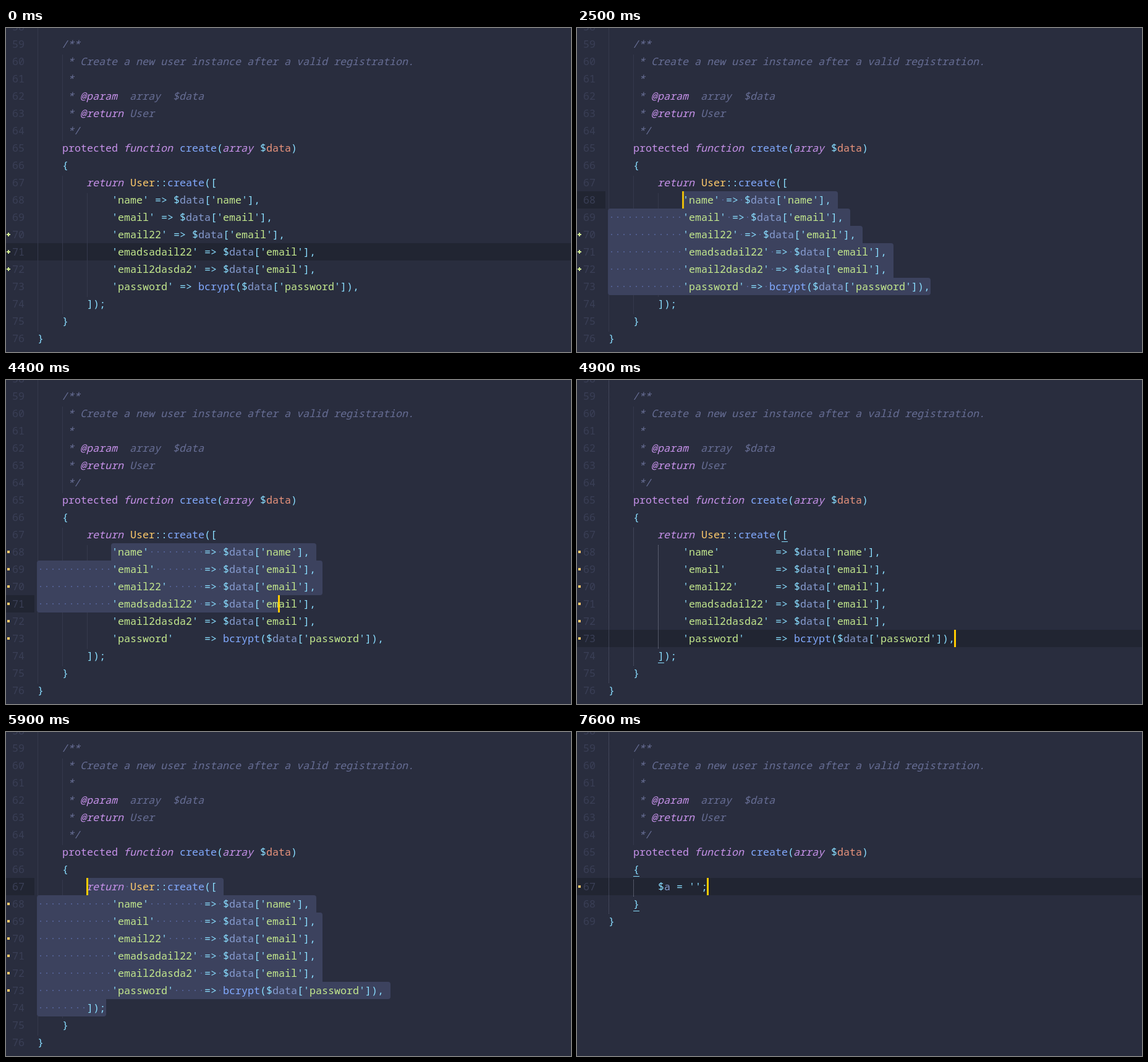
Recreate the animation shown at these times as an HTML page with a canvas. Size 914 px wide and 524 px high, loop 8 s.

```html
<!DOCTYPE html>
<html lang="en">
<head>
<meta charset="utf-8">
<title>Aligning code</title>
<style>
html, body { margin: 0; width: 100%; height: 100%; overflow: hidden; background: #292d3e; }
canvas { display: block; }
</style>
</head>
<body>
<canvas id="stage" width="914" height="524"></canvas>
<script>
const ctx = document.getElementById('stage').getContext('2d');
const W = 914, H = 524, LOOP = 8000;
const CELL = 10, ROW = 28, LEFT = 51, FIRST = 58;
const FACE = '16.667px "Noto Sans Mono", "DejaVu Sans Mono", monospace';

const C = {
  bg: '#292d3e', line: '#212532', select: '#3c425e', space: '#515e8f',
  number: '#3a3f56', guide: '#35394c', dotted: '#5a5f75', active: '#868a9c',
  caret: '#ffcc00', added: '#d3ec92', changed: '#ffcb6b',
  comment: '#676e95', key: '#c792ea', fn: '#82aaff', op: '#89ddff',
  str: '#c3e88d', type: '#ffcb6b', arg: '#e8937c', name: '#869bcf'
};
const WORDS = {
  protected: C.key, function: C.key, array: C.key, return: C.key,
  create: C.fn, bcrypt: C.fn, User: C.type, data: C.name, a: C.name
};
const SLANTED = ['function', 'array', 'return'];

const HEAD = [
  '',
  '    /**',
  '     * Create a new user instance after a valid registration.',
  '     *',
  '     * @param  array  $data',
  '     * @return User',
  '     */',
  '    protected function create(array $data)',
  '    {'
];
const FIELDS = [
  ['name', 'name'], ['email', 'email'], ['email22', 'email'],
  ['emadsadail22', 'email'], ['email2dasda2', 'email'], ['password', 'password']
];

const rowTop = row => (row - FIRST) * ROW - 16;
const colX = col => LEFT + col * CELL;

function makeLines(t) {
  let body;
  if (t >= 6500) {
    body = [' '.repeat(8) + typed(t)];
  } else {
    const width = t >= 2800 ? 14 : 0;
    const fields = FIELDS.map(([key, src]) => {
      const value = `$data['${src}']`;
      const right = key === 'password' ? `bcrypt(${value})` : value;
      return ' '.repeat(12) + `'${key}'`.padEnd(width) + ` => ${right},`;
    });
    body = ['        return User::create([', ...fields, '        ]);'];
  }
  return [...HEAD, ...body, '    }', '}'];
}

const KEYS = [[6800, 2], [6900, 3], [7100, 4], [7200, 5], [7300, 7], [7600, 8]];
function typed(t) {
  const hit = KEYS.filter(([at]) => t >= at).pop();
  return "$a = '';".slice(0, hit ? hit[1] : 0);
}

// A drag yields one caret place every 100 ms.
function drag(start, count, from, to, anchor) {
  return Array.from({ length: count }, (_, i) => {
    const k = i / (count - 1);
    const pos = from.map((v, j) => Math.round(v + (to[j] - v) * k));
    return [start + i * 100, pos, anchor, 1];
  });
}

// time, caret, selection anchor, caret opacity
const RAW_END = [73, 52], END = [73, 56], TOP = [68, 12], CLOSE = [74, 11];
const STEPS = [
  [0, [71, 0], null, 0],
  [1000, RAW_END, null, 1],
  [1100, [71, 37], RAW_END, 1],
  ...drag(1300, 7, [69, 25], TOP, RAW_END),
  [2500, TOP, RAW_END, 0.88],
  [2600, TOP, RAW_END, 0],
  [2800, TOP, END, 1],
  [3200, TOP, END, 0.88],
  [3300, TOP, END, 0],
  [3800, TOP, null, 1],
  ...drag(4100, 6, [68, 14], [73, 55], TOP),
  [4900, END, null, 1],
  [5300, CLOSE, null, 1],
  ...drag(5400, 4, [73, 11], [68, 9], CLOSE),
  [5900, [67, 8], CLOSE, 1]
];

function caretState(t, lines) {
  if (t >= 6500) {
    const inside = t >= 7300 && t < 7400 ? 1 : 0;
    return { pos: [67, lines[67 - FIRST].length - inside], anchor: null, ink: 1 };
  }
  const [, pos, anchor, ink] = STEPS.filter(s => t >= s[0]).pop();
  return { pos, anchor, ink };
}

function rect(color, x, y, w, h) {
  ctx.fillStyle = color;
  ctx.fillRect(x, y, w, h);
}

// Punctuation is a little heavier; slanted text leans from one pixel further left.
function put(text, col, row, color, slant) {
  const weight = color === C.op ? '500 ' : '';
  ctx.font = (slant ? 'italic ' : '') + weight + FACE;
  ctx.fillStyle = color;
  [...text].forEach((ch, i) => {
    if (ch !== ' ') ctx.fillText(ch, colX(col + i) - (slant ? 1 : 0), rowTop(row) + 20);
  });
}

function drawLine(text, row) {
  const note = row < 65;
  const pattern = note ? /@\w+|[^@]+/g : /'[^']*'|\w+|\s+|./g;
  for (const { 0: tok, index } of text.matchAll(pattern)) {
    if (note) {
      put(tok, index, row, tok[0] === '@' ? C.key : C.comment, true);
    } else if (tok.length > 1 && tok[0] === "'") {
      put("'", index, row, C.op);
      put(tok.slice(1, -1), index + 1, row, C.str);
      put("'", index + tok.length - 1, row, C.op);
    } else {
      const color = row === 65 && tok === 'data' ? C.arg : WORDS[tok] || C.op;
      put(tok, index, row, color, SLANTED.includes(tok));
    }
  }
}

function guide(col, from, to, color, dotted) {
  const x = colX(col), y0 = rowTop(from) + 3, y1 = rowTop(to + 1) + 3;
  if (!dotted) return rect(color, x, y0, 1, y1 - y0);
  for (let y = y0; y < y1; y += 2) rect(color, x, y, 1, 1);
}

function drawGuides(last, dotted) {
  const outer = dotted ? C.dotted : C.guide;
  const inner = dotted ? C.active : C.guide;
  const nested = last > 70;
  guide(0, FIRST, last - 1, outer, dotted);
  guide(4, 60, 64, C.guide, false);
  guide(4, 67, last - 2, nested ? outer : inner, dotted);
  if (nested) guide(8, 68, 73, inner, dotted);
}

function drawSelection(a, b, lines) {
  const [from, to] = a[0] < b[0] || (a[0] === b[0] && a[1] < b[1]) ? [a, b] : [b, a];
  const spans = [];
  for (let row = from[0]; row <= to[0]; row++) {
    const start = row === from[0] ? from[1] : 0;
    const end = row === to[0] ? to[1] : lines[row - FIRST].length + 1;
    spans.push({ row, start, end });
  }
  const covers = (s, col) => s && s.start <= col && s.end >= col;
  spans.forEach((s, i) => {
    const up = spans[i - 1], down = spans[i + 1];
    const r = (n, col) => covers(n, col) ? 0 : 4;
    ctx.fillStyle = C.select;
    ctx.beginPath();
    ctx.roundRect(colX(s.start) - 1, rowTop(s.row), (s.end - s.start) * CELL + 2, ROW,
      [r(up, s.start), r(up, s.end), r(down, s.end), r(down, s.start)]);
    ctx.fill();
    const text = lines[s.row - FIRST];
    for (let c = s.start; c < Math.min(s.end, text.length); c++) {
      if (text[c] === ' ') rect(C.space, colX(c) + 4, rowTop(s.row) + 13, 2, 2);
    }
  });
}

function drawMarks(t) {
  if (t < 3200) {
    for (let row = 70; row <= 72; row++) {
      const y = rowTop(row) + 14;
      rect(C.added, 1, y - 1, 6, 2);
      rect(C.added, 3, y - 3, 2, 6);
    }
    return;
  }
  const [from, to] = t < 6500 ? [68, 73] : [67, 67];
  for (let row = from; row <= to; row++) rect(C.changed, 2, rowTop(row) + 12, 4, 4);
}

function drawPair(row, last) {
  const braces = row === 74 || last < 70;
  const ends = braces ? [[66, 4], [last - 1, 4]] : [[67, 28], [74, 8]];
  for (const [r, c] of ends) rect(C.op, colX(c), rowTop(r) + 25, CELL, 1);
}

function draw(t) {
  const lines = makeLines(t);
  const last = FIRST + lines.length - 1;
  const { pos, anchor, ink } = caretState(t, lines);
  const focused = !anchor && t >= 1000;

  rect(C.bg, 0, 0, W, H);
  rect(C.line, 0, rowTop(pos[0]), anchor ? 46 : W, ROW);
  drawGuides(last, focused);
  if (anchor) drawSelection(pos, anchor, lines);
  lines.forEach((text, i) => {
    put(String(FIRST + i), -4.1, FIRST + i, C.number);
    drawLine(text, FIRST + i);
  });
  drawMarks(t);
  if (focused) drawPair(pos[0], last);
  ctx.globalAlpha = ink;
  rect(C.caret, colX(pos[1]) - 1, rowTop(pos[0]), 3, ROW);
  ctx.globalAlpha = 1;
}

const begin = performance.now();
function tick() {
  draw((performance.now() - begin) % LOOP);
  requestAnimationFrame(tick);
}
tick();
</script>
</body>
</html>
```
